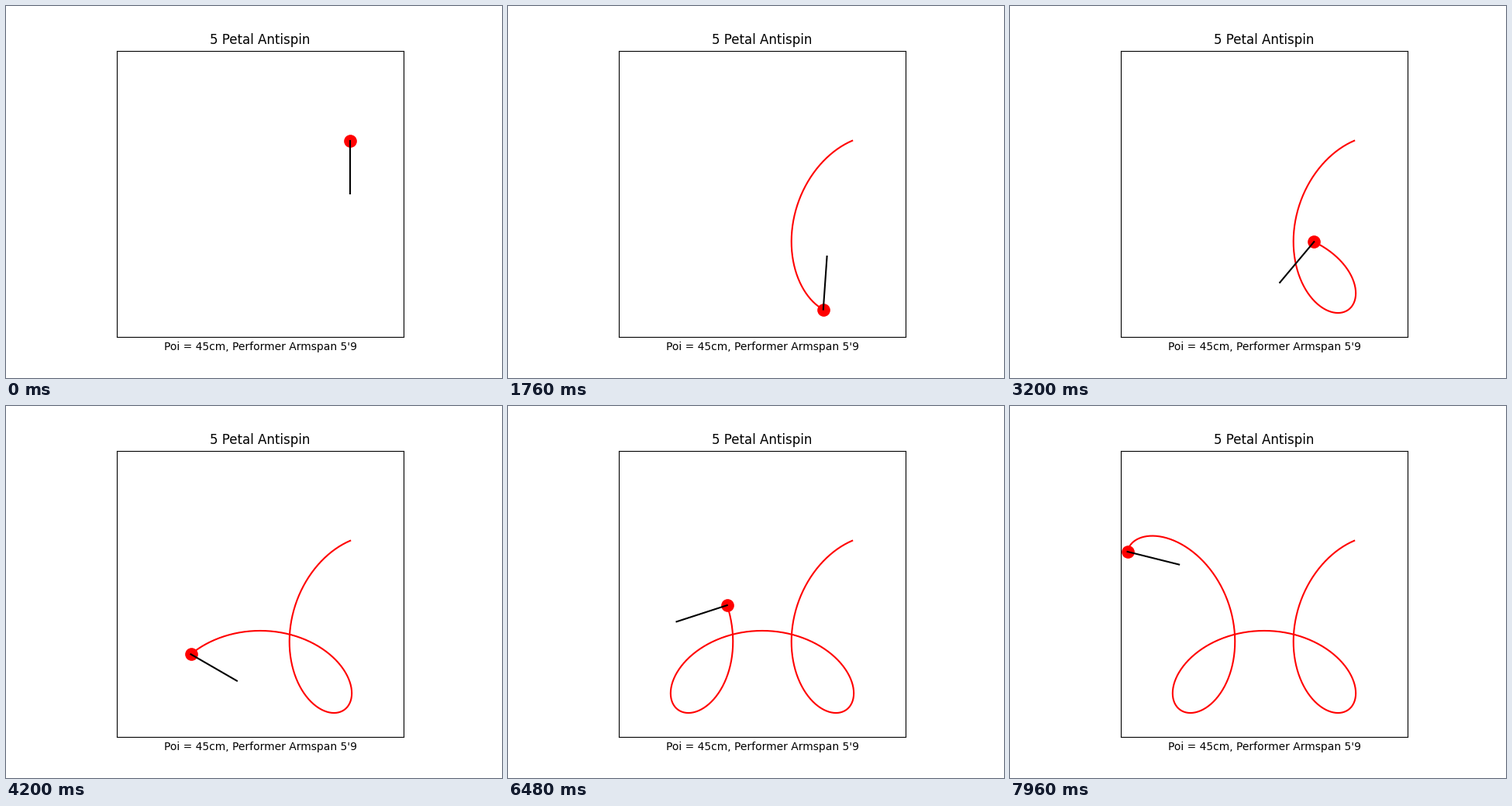
Animation, 640 px wide and 480 px high, one loop 8000 ms. Source, as a matplotlib script:

```python
import numpy as np
import matplotlib.pyplot as plt
from matplotlib.animation import FuncAnimation

FRAMES = 200
INTERVAL = 40      # ms
PETALS = 5
ARM = 76.2         # cm
POI = 45.0         # cm
REACH = ARM + POI

# The hand turns clockwise one degree per frame, the poi the other way.
deg = np.arange(FRAMES)
hand_angle = np.radians(-deg)
poi_angle = np.radians(90 + (PETALS - 1) * deg)
hand_x, hand_y = ARM * np.cos(hand_angle), ARM * np.sin(hand_angle)
poi_x = hand_x + POI * np.cos(poi_angle)
poi_y = hand_y + POI * np.sin(poi_angle)

plt.rcParams["font.family"] = "DejaVu Sans"
fig, ax = plt.subplots(figsize=(6.4, 4.8), dpi=100)
ax.set_aspect("equal")
ax.set_xlim(-REACH, REACH)
ax.set_ylim(-REACH, REACH)
ax.set_xticks([])
ax.set_yticks([])
ax.set_title("5 Petal Antispin")
ax.set_xlabel("Poi = 45cm, Performer Armspan 5'9")

trail, = ax.plot([], [], color="red", lw=1.5)
head, = ax.plot([], [], "o", color="red", ms=12, mew=0)
tether, = ax.plot([], [], color="black", lw=1.5)


def update(i):
    trail.set_data(poi_x[:i + 1], poi_y[:i + 1])
    head.set_data([poi_x[i]], [poi_y[i]])
    tether.set_data([hand_x[i], poi_x[i]], [hand_y[i], poi_y[i]])
    return trail, head, tether


anim = FuncAnimation(fig, update, frames=FRAMES, interval=INTERVAL, repeat=True)
plt.show()
```
